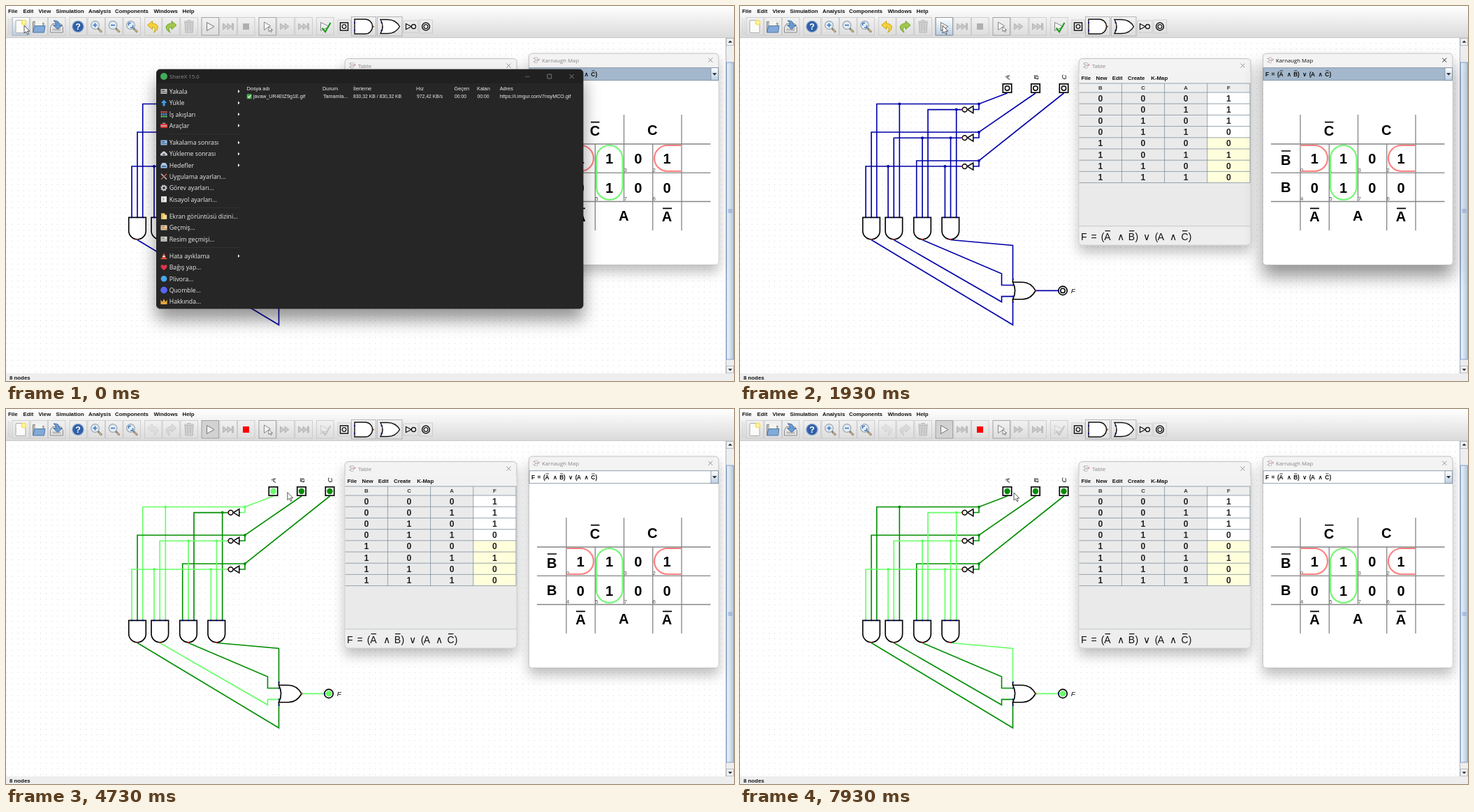
Recreate the animation shown at these times as an HTML page. Size 1042x538 px, loop 8000 ms.

```html
<!DOCTYPE html>
<html lang="en">
<head>
<meta charset="utf-8">
<title>Circuit simulation</title>
<style>
html, body { margin: 0; width: 100%; height: 100%; overflow: hidden; background: #fff; }
svg { display: block; width: 100vw; height: 100vh; }
text { font-family: "Liberation Sans", Arial, sans-serif; white-space: pre; }
.b { font-weight: bold; }
.m { text-anchor: middle; }
.i { font-style: italic; }
.u { font-family: "Open Sans", "Noto Sans", sans-serif; }
.off { filter: grayscale(1); opacity: .3; }
</style>
</head>
<body>
<svg id="stage" viewBox="0 0 1042 538" xmlns="http://www.w3.org/2000/svg"></svg>
<script>
const stage = document.getElementById('stage');
const text = (x, y, s, size, cls = '', fill = '#111') =>
  `<text x="${x}" y="${y}" font-size="${size}" class="${cls}" fill="${fill}">${s}</text>`;
const rect = (x, y, w, h, fill, more = '') =>
  `<rect x="${x}" y="${y}" width="${w}" height="${h}" fill="${fill}" ${more}/>`;
const path = (d, stroke, width = 1, fill = 'none', more = '') =>
  `<path d="${d}" ${stroke ? `stroke="${stroke}"` : ''} stroke-width="${width}" fill="${fill}" ${more}/>`;
const dot = (x, y, r, fill, more = '') => `<circle cx="${x}" cy="${y}" r="${r}" fill="${fill}" ${more}/>`;
const at = (x, y, inner, more = '') => `<g transform="translate(${x} ${y})" ${more}>${inner}</g>`;
const range = n => [...Array(n).keys()];

const gradient = (id, a, b, vertical = true) =>
  `<linearGradient id="${id}" x2="${vertical ? 0 : 1}" y2="${vertical ? 1 : 0}"><stop stop-color="${a}"/><stop offset="1" stop-color="${b}"/></linearGradient>`;
const shadow = (id, dy, blur, alpha) =>
  `<filter id="${id}" x="-20%" y="-20%" width="140%" height="150%"><feDropShadow dx="0" dy="${dy}" stdDeviation="${blur}" flood-opacity="${alpha}"/></filter>`;
const defs = `<defs>
${gradient('bar', '#fff', '#dadada')}${gradient('hot', '#fff', '#b8cfe5')}${gradient('thumb', '#f4f8fc', '#b0cae4', false)}
${shadow('near', 16, 12, .42)}${shadow('far', 10, 8.5, .25)}
<pattern id="grid" x=".36" y="4.3" width="8.12" height="8.12" patternUnits="userSpaceOnUse">${rect(0, 0, 1, 1, '#d2d2d2')}</pattern>
</defs>`;

// ---------- toolbar ----------
const buttons = [21, 47, 72.5, 103, 129, 154.5, 180, 210.5, 236, 262, 292, 318, 343.5, 374, 400, 426, 456.5];
const enabled = [0, 1, 2, 3, 4, 5, 6, 7, 8, 10, 13, 16];
const toggles = [10, 13];

const lens = inner => path('M2.5 2.5L8 8', '#777', 2.8) + path('M4 4L7.5 7.5', '#e8c46a', 1.1)
  + dot(-1.5, -2, 5.8, '#e3edf6', 'stroke="#9aa4ad" stroke-width="1.2"') + path(inner, '#3c74b8', 1.6);
const plus = 'M-4.5 -2H1.5M-1.5 -5V1';
const bend = 'M-8 -2L-1 -8V-4.5C9 -4 9 4 1 8.5C4 4 3 1 -1 .8V4Z';
const fast = (end = '') => path('M-7.5 -4.5L-1.5 0L-7.5 4.5ZM-1 -4.5L5 0L-1 4.5Z' + end, '#b4b4b4', 1, '#c8c8c8');
const pointer = path('M0 0V7L2 5.4L3.2 8L4.4 7.4L3.2 5H5.6Z', '#555', .7, '#fff');
const icons = [
  rect(-7, -9, 14, 18, '#fbfbf9', 'stroke="#aaa" rx="1"') + dot(4.5, -6, 4, '#f8e46c') + dot(4.5, -6, 2, '#fff8b0'),
  path('M-8.5 8V-7H-2L0 -5H7V8Z', '#888', 1, '#bdbdb4') + rect(-5, -8, 10, 7, '#f4f4f0') + path('M-6 -1H9L7.5 8.5H-8.5Z', '#4a76ab', 1, '#83aad6'),
  path('M-9 1L-6 -4H6L9 1V8.5H-9Z', '#888', 1, '#e4e4e4') + rect(-6, 3, 12, 3, '#bbb') + path('M-4.5 -8.5C3 -9 4 -5 4 -2H8L1.5 4L-5 -2H-1C-1 -5 -2 -7 -4.5 -8.5Z', '#2b5c9b', .8, '#6b9bd0'),
  dot(0, 0, 8.2, '#2f5fa6', 'stroke="#9db3d2" stroke-width="1.2"') + text(0, 4.4, '?', 12.5, 'b m', '#fff'),
  lens(plus), lens('M-4.5 -2H1.5'), lens('M-4.5 -1.5V-5H-1M1.5 -2V1.5H-2'),
  `<g id="undo">${path(bend, '#c4a000', .9, '#f3d13f')}</g>`,
  `<g id="redo"><g transform="scale(-1 1)">${path(bend, '#5f9a1e', .9, '#a3c84a')}</g></g>`,
  path('M-6 -6H6L5 8.5H-5ZM-7 -7.5H7M-2.5 -9H2.5M-2 -4V6M2 -4V6', '#b8b8b8', 1.1, '#d0d0d0'),
  path('M-4.5 -6L6 0L-4.5 6Z', '#777', 1, '#f0f0f0'),
  fast('M5.5 -4.5H7.5V4.5H5.5Z'),
  `<rect id="stop" x="-4.5" y="-4.5" width="9" height="9"/>`,
  path('M-4.5 -6.5L4.5 -1L-4.5 5Z', '#888', 1, '#f4f4f4') + at(2, 0, pointer),
  fast(), fast('M5.5 -4.5H7.5V4.5H5.5Z'),
  `<g id="check">${path('M-6 -6L6 0L-6 6Z', '#888', 1, '#f4f4f4') + path('M-4 2L.5 7.5L8 -5.5', '#22a022', 2.2)}</g>`
];
const frame = (x, w, y = 16.5, h = 25.5, color = '#c6c6c6') => rect(x, y, w, h, 'none', `stroke="${color}" stroke-width=".8"`);
const andIcon = path('M499 19H514A10.5 10.5 0 0 1 514 40H499Z', '#111', 1.4, '#fff')
  + dot(499, 24, 1, '#00a') + dot(499, 35, 1, '#00a') + dot(526, 29.5, 1, '#d00');
const orIcon = path('M536 19.5H546C556 19.5 561 25 563.5 29.5C561 34 556 39.5 546 39.5H536C540 33 540 26 536 19.5Z', '#111', 1.4, '#fff')
  + dot(537.5, 24, 1, '#00a') + dot(537.5, 35, 1, '#00a');
const menus = [['File', 3], ['Edit', 24.5], ['View', 46.5], ['Simulation', 71.5], ['Analysis', 118], ['Components', 156], ['Windows', 211.5], ['Help', 252.5]];
const toolbar = rect(0, 0, 1042, 45.5, 'url(#bar)') + path('M0 45.5H1042', '#c4c4c4', .8)
  + menus.map(([s, x]) => text(x, 10, s, 7.85, 'b')).join('')
  + path('M3.5 18V41M6 19V41', '#b5b5b5', 1, 'none', 'stroke-dasharray="1 1.6"')
  + `<rect id="hover" width="24.5" height="25.5" y="16.5" fill="url(#hot)" stroke="#8a9bb0" stroke-width=".8"/>`
  + `<rect id="pressed" x="280" width="24.5" height="25.5" y="16.5" fill="#d2d2d2"/>`
  + buttons.map((x, i) => frame(x - 12, 24.5, 16.5, 25.5, toggles.includes(i) ? '#929292' : '#c6c6c6') + at(x, 29.5, icons[i])).join('')
  + frame(475, 18.5, 20, 19) + frame(494.5, 35, 15.5, 27.5, '#a8a8a8') + frame(531.5, 35.5, 15.5, 27.5, '#a8a8a8') + frame(569, 21, 21, 17) + frame(592, 18.5, 20, 19)
  + rect(478.5, 24, 11, 11, '#fff', 'stroke="#111" stroke-width="1.5"') + dot(484, 29.5, 2.8, '#fff', 'stroke="#111" stroke-width="1.3"')
  + andIcon + orIcon
  + path('M572.5 25.5V33.5L580 29.5Z', '#111', 1.3, '#fff') + dot(583.5, 29.5, 3, '#fff', 'stroke="#111" stroke-width="1.3"')
  + dot(601, 29.5, 5.4, '#fff', 'stroke="#111" stroke-width="1.5"') + dot(601, 29.5, 2.9, '#fff', 'stroke="#111" stroke-width="1.3"');

const chrome = rect(1030.5, 46, 11.5, 481, '#eee') + path('M1030.5 46V527', '#9aa7b4', .8)
  + rect(1031, 46.4, 10.6, 10.3, '#f1f1f1', 'stroke="#9aa7b4" stroke-width=".7"') + path('M1033.5 52.5L1036.5 49.5L1039.5 52.5Z', '', 0, '#222')
  + rect(1031, 516.5, 10.6, 10.3, '#f1f1f1', 'stroke="#9aa7b4" stroke-width=".7"') + path('M1033.5 520.5L1036.5 523.5L1039.5 520.5Z', '', 0, '#222')
  + rect(1031.3, 81, 10, 426, 'url(#thumb)', 'stroke="#6382bf" stroke-width=".7"')
  + path('M1033.5 292H1039.5M1033.5 294H1039.5M1033.5 296H1039.5', '#6382bf', .7)
  + rect(0, 527, 1042, 11, '#eee') + text(5, 535.8, '8 nodes', 7.85, 'b');

// ---------- circuit ----------
const inputs = { A: [382.5, 140.5], B: [423, 181], C: [463.5, 222] };
const nets = {
  A: ['M382.5 125L342 140.5H195.7V303M228.3 140.5V303', [[228.3, 140.5]]],
  B: ['M423 125L342 181H188V303', []],
  C: ['M463.5 125L342 222H252.7V303', []],
  nA: ['M317.5 148.6H269V303M309.7 148.6V303', [[309.7, 148.6]]],
  nB: ['M317.5 189.2H220.2V303M261 189.2V303M301.5 189.2V303', [[261, 189.2], [301.5, 189.2]]],
  nC: ['M317.5 230H180V303M212 230V303M293.4 230V303', [[212, 230], [293.4, 230]]],
  g1: ['M188 335.5L390.5 457.5V425', []],
  g2: ['M220.3 335.5L374.5 424.5V416.6H391', []],
  g3: ['M261 335.5L374.5 384V400.5H391', []],
  g4: ['M301.5 335.5L390.5 343.5V392', []],
  F: ['M423 408.4H456', []]
};
for (const k of 'ABC') {
  const y = inputs[k][1];
  nets[k][0] += `M342 ${y}V${y + 8}H334.5`;
  nets[k][1].push([342, y]);
}
const wires = Object.entries(nets).map(([k, [d, joints]]) =>
  `<g id="net${k}">${path(d, '', 1.65)}${joints.map(([x, y]) => `<circle cx="${x}" cy="${y}" r="2" stroke="none"/>`).join('')}</g>`).join('');
const gates = [188, 220.3, 261, 301.3].map(x =>
  path(`M${x - 12.3} 303.3H${x + 12.3}V322.5A12.3 12.3 0 0 1 ${x - 12.3} 322.5Z`, '#000', 1.65, '#fff')
  + [-8.1, 0, 8.1].map(d => dot(x + d, 303.3, 1.1, '#00a')).join('') + dot(x, 335, 1.1, '#d00')).join('');
const inverters = Object.values(inputs).map(([, y]) => at(0, y + 8.1,
  path('M333.8 -5V5L325.5 0Z', '#000', 1.5, '#fff') + dot(321.6, 0, 3.4, '#fff', 'stroke="#000" stroke-width="1.5"')
  + dot(317.8, 0, 1, '#d00') + dot(334.2, 0, 1, '#00a'))).join('');
const pins = Object.entries(inputs).map(([k, [x]]) =>
  rect(x - 6.2, 111.8, 12.4, 12.4, '#fff', 'stroke="#000" stroke-width="1.65"')
  + `<circle id="pin${k}" cx="${x}" cy="118"/>`
  + `<text transform="translate(${x + 3.6} 105.6) rotate(-90)" font-size="9.8" class="i">${k}</text>`).join('');
const orGate = path('M390.5 396.2H404C414 396.2 420 403 423 408.4C420 414 414 420.7 404 420.7H390.5C394.5 413 394.5 404 390.5 396.2ZM390.5 392V396.2M390.5 420.7V425', '#000', 1.65, '#fff')
  + [392, 400.5, 416.6, 425].map(y => dot(390.8, y, 1.1, '#00a')).join('') + dot(423.3, 408.4, 1.1, '#d00');
const outPin = dot(462, 408.4, 6.2, '#fff', 'stroke="#000" stroke-width="1.65"') + '<circle id="pinF" cx="462" cy="408.4"/>'
  + dot(456, 408.4, 1.1, '#00a') + text(473.8, 412, 'F', 9.8, 'i');
const circuit = rect(0, 46, 1031, 481, '#fff') + rect(0, 46, 1031, 481, 'url(#grid)')
  + wires + gates + inverters + pins + orGate + outPin;

// ---------- tool windows ----------
const formula = (x, y, k, cls = '') => `<g transform="translate(${x} ${y}) scale(${k})">`
  + [['F', 4.3], ['=', 18.5], ['(', 31], ['A', 38], ['∧', 57], ['B', 72.5], [')', 79.8], ['∨', 94], ['(', 108], ['A', 114.5], ['∧', 132], ['C', 148.5], [')', 156]]
    .map(([s, dx]) => text(dx, 0, s, 14, 'm ' + cls)).join('')
  + path('M34.5 -13.6H42M69 -13.6H76.5M145 -13.6H152.5', '#111', 1.3) + '</g>';
const cross = (x, y, c) => path(`M${x - 3} ${y - 3}l6 6m0 -6l-6 6`, c, .9);
const appIcon = (x, y) => at(x, y, path('M0 1.5H4M0 6H4M6 4H9', '#999', .8) + rect(2.5, 0, 3.5, 3, '#fff', 'stroke="#999" stroke-width=".6"')
  + rect(2.5, 4.6, 3.5, 3, '#fff', 'stroke="#999" stroke-width=".6"') + dot(8.3, 2.5, 1, '#d88'));
const pane = (id, x, y, w, h) => `<rect ${id ? `id="${id}"` : ''} x="${x}" y="${y}" width="${w}" height="${h}" rx="5" fill="#f3f3f3" stroke="#b4b4b4" stroke-width=".8" filter="url(#far)"/>`;

const colX = [485.5, 546.7, 607.9, 669.1];
const rowY = r => 124 + 16.2 * r;
const tableRows = range(8).map(r => {
  const b = r >> 2, c = r >> 1 & 1, a = r & 1, f = a ? 1 - c : 1 - b;
  return rect(669, rowY(r), 61, 16.2, r < 4 ? '#fff' : '#ffffdc')
    + [b, c, a, f].map((v, i) => text(colX[i] + 30.3, rowY(r) + 12.5, v, 12.2, 'b m', '#222')).join('');
}).join('');
const table = pane('', 485, 75.5, 246, 267.5) + appIcon(491, 81.5) + text(504, 88.7, 'Table', 7.75, 'u', '#858585') + cross(719.5, 85.5, '#888')
  + rect(485.4, 96, 245.2, 14.5, '#f2f2f2')
  + [['File', 488.5], ['New', 509.5], ['Edit', 532.8], ['Create', 555], ['K-Map', 588.3]].map(([s, x]) => text(x, 105.5, s, 7.85, 'b')).join('')
  + rect(485.4, 110.5, 245.2, 205.5, '#eaeaea') + rect(485.4, 111, 244.6, 13, '#eee')
  + ['B', 'C', 'A', 'F'].map((s, i) => text(colX[i] + 30.3, 120.3, s, 7.85, 'b m', '#333')).join('')
  + tableRows
  + path(colX.slice(1).map(x => `M${x - .3} 111V253.6`).join('') + 'M730 111V253.6M485.5 111H730' + range(9).map(r => `M485.5 ${rowY(r)}H730`).join(''), '#7a8a99', .75)
  + path('M485.5 316H730.5', '#a5adb5', .8)
  + path('M485.4 316.4H730.6V338A4.6 4.6 0 0 1 726 342.6H490A4.6 4.6 0 0 1 485.4 338Z', '', 0, '#eee')
  + formula(488, 336.2, 1);

const kText = (x, y, s) => text(x, y, s, 20, 'b m', '#000');
const kCol = i => 822.4 + 41.2 * i;
const kmap = pane('kpane', 748.5, 68, 271.5, 303.5) + appIcon(754.5, 74)
  + '<text id="ktitle" x="767" y="81" font-size="7.75" class="u">Karnaugh Map</text><g id="kclose">' + cross(1008.3, 77.7, '') + '</g>'
  + path('M748.9 107H1019.6V366.5A4.6 4.6 0 0 1 1015 371.1H753.5A4.6 4.6 0 0 1 748.9 366.5Z', '', 0, '#fff')
  + '<rect id="combo" x="749" y="88.7" width="270.6" height="18" stroke="#7a8a99" stroke-width=".8"/>'
  + rect(1009, 88.7, 10.6, 18, 'url(#hot)', 'stroke="#7a8a99" stroke-width=".8"') + path('M1011 96.2H1017.4L1014.2 99.5Z', '', 0, '#222')
  + formula(752, 101, .595, 'b')
  + path('M802 156V322M843.3 198V322M884.5 156V280.5M925.7 198V322M967 156V322M760 198H1008.5M760 239.3H1008.5M760 280.5H1008.5', '#858585', 1.3)
  + [['C', 843, 186.3], ['C', 925.3, 185], ['B', 781.3, 227.8], ['B', 781.3, 267.2], ['A', 822.4, 309], ['A', 884.2, 308.3], ['A', 946, 309]].map(([s, x, y]) => kText(x, y, s)).join('')
  + path('M837 166.7H849.5M775 208H788M816 290.3H829M940 290.3H953', '#000', 1.7)
  + [[1, 1, 0, 1], [0, 1, 0, 0]].map((row, r) => row.map((v, i) => kText(kCol(i), 226.2 + 41.3 * r, v)).join('')).join('')
  + [[0, 1, 3, 2], [4, 5, 7, 6]].map((row, r) => row.map((v, i) => text(802 + 41.2 * i, 238.2 + 41.2 * r, v, 7.8, '', '#555')).join('')).join('')
  + path('M802.5 200H822.5A18.5 18.5 0 0 1 822.5 237H802.5M966.5 200H946.5A18.5 18.5 0 0 0 946.5 237H966.5', '#ff8080', 2.2)
  + rect(845, 200, 37.5, 78, 'none', 'rx="18.7" stroke="#72f772" stroke-width="2.2"');

// ---------- capture window ----------
const card = (a, b) => rect(-4.5, -3.5, 9, 7, a) + rect(-3.5, -2, 5, 1.6, b) + rect(-3.5, 1, 7, 1, b);
const solid = (d, fill) => path(d, '', 0, fill);
const entries = [
  ['Yakala', 122.5, 1, card('#b9bcc0', '#555')],
  ['Yükle', 139, 1, solid('M0 -4.5L4.3 0H1.6V4.5H-1.6V0H-4.3Z', '#3f9bea')],
  ['İş akışları', 155.3, 1, range(9).map(i => rect(i % 3 * 3.2 - 4.4, (i / 3 | 0) * 3.2 - 4.4, 2.4, 2.4, ['#e04b4b', '#4b8fe0', '#5fc05f'][(i / 3 | 0)])).join('')],
  ['Araçlar', 171.5, 1, rect(-4.7, -2.5, 9.4, 6, '#d93434') + rect(-2, -4, 4, 1.5, '#999') + rect(-4.7, 0, 9.4, 1, '#eee')],
  ['Yakalama sonrası', 196, 1, card('#9cc3ea', '#2c5f97')],
  ['Yükleme sonrası', 212.2, 1, solid('M-4.5 2.5A2.5 2.5 0 0 1 -3 -1.5A3.2 3.2 0 0 1 3 -1.5A2.5 2.5 0 0 1 4.5 2.5Z', '#c9ced4') + path('M0 4.5V0M-1.8 1.5L0 -.5L1.8 1.5', '#444', 1)],
  ['Hedefler', 228.5, 1, solid('M-4.5 4V0L-2.5 -3.5H2.5L4.5 0V4Z', '#a9c6e6') + rect(-3, .5, 6, 2, '#3d6ea5')],
  ['Uygulama ayarları...', 244.8, 0, path('M-4 -4L4 4', '#c9c9c9', 1.5) + path('M4 -4L-4 4', '#d35b4b', 1.5)],
  ['Görev ayarları...', 261, 0, dot(0, 0, 2.7, 'none', 'stroke="#c4c8cc" stroke-width="2"') + dot(0, 0, 4, 'none', 'stroke="#c4c8cc" stroke-width="1.3" stroke-dasharray="1.6 1.54"')],
  ['Kısayol ayarları...', 277.3, 0, rect(-4, -4.2, 8, 8.4, '#e6e8ea') + path('M-2 -2L0 0L-2 2', '#666', 1)],
  ['Ekran görüntüsü dizini...', 301.6, 0, rect(-4, -4.3, 5.5, 8.6, '#e8bf55') + rect(-1, -2, 5.2, 6.3, '#f4dd96')],
  ['Geçmiş...', 318, 0, card('#ead8b4', '#c4743a')],
  ['Resim geçmişi...', 334.3, 0, card('#dcdcd4', '#7d7d74')],
  ['Hata ayıklama', 358.7, 1, solid('M0 -4.7L3 3H4.5V4.5H-4.5V3H-3Z', '#e2533d') + path('M-2 .5H2', '#fff', 1.4)],
  ['Bağış yap...', 375, 0, solid('M0 4.3C-8 -1.5 -3.5 -6.5 0 -2.3C3.5 -6.5 8 -1.5 0 4.3Z', '#e0344a')],
  ['Plivora...', 391.3, 0, dot(0, 0, 4.3, '#4aa7e8')],
  ['Quomble...', 407.6, 0, dot(0, 0, 4.8, '#5865f2')],
  ['Hakkında...', 424, 0, solid('M-4.5 4L-4.7 -2.5L-2 .5L0 -4L2 .5L4.7 -2.5L4.5 4Z', '#e9a63a')]
];
const cells = [
  [344.5, 'Dosya adı', 354, 'javaw_UR4EtZ9g1E.gif', 7.2], [453, 'Durum', 454, 'Tamamla...', 7.2],
  [497, 'İlerleme', 497, '830,32 KB / 830,32 KB', 6.8], [587, 'Hız', 588, '972,42 KB/s', 6.8],
  [641.5, 'Geçen', 642, '00:00', 6.8], [674, 'Kalan', 674.5, '00:00', 6.8],
  [706.7, 'Adres', 706.7, 'https://i.imgur.com/7nsyMCO.gif', 7.2]
];
const capture = rect(215.5, 91, 610.5, 343, '#282828', 'rx="5" stroke="#161616" stroke-width=".8" filter="url(#near)"')
  + solid('M215.9 111V96A4.6 4.6 0 0 1 220.5 91.4H821A4.6 4.6 0 0 1 825.6 96V111Z', '#202020')
  + dot(226, 101, 5, '#3fae5a') + text(234, 104, 'ShareX 15.0', 7.8, 'u', '#8d8d8d')
  + path('M743 101.3H749.5', '#6a6a6a', .9) + rect(774.8, 98, 6, 6, 'none', 'rx="1" stroke="#8a8a8a" stroke-width=".9"') + cross(809.7, 101, '#8a8a8a')
  + path('M234 183.7H336M234 289.5H336M234 346.5H336', '#343434', .8)
  + entries.map(([s, y, sub, icon]) => at(226, y, icon) + text(233.7, y + 3.2, s, 8.75, 'u', '#ececec')
    + (sub ? solid(`M332 ${y - 2.4}L334.6 ${y}L332 ${y + 2.4}Z`, '#eee') : '')).join('')
  + cells.map(([x, h, vx, v, size]) => text(x, 120.6, h, 7.35, '', '#eee') + text(vx, 132.3, v, size, '', '#eee')).join('')
  + rect(344.7, 126.3, 7, 7, '#3fae49', 'rx="1"') + path('M346.2 129.8L347.8 131.4L350.4 128', '#fff', 1.1);

const tipLines = ['Can be used to interactively manipulate an input signal in a circuit', 'with the mouse. This element is also used to connect a circuit to an',
  'embedding circuit. In this case the connection is bidirectional. Is', 'also used to assign an pin number, if code for a CPLD or FPGA is', 'generated. Exportable to VHDL/Verilog.'];
const tip = rect(381.5, 128.3, 260.5, 55.2, '#b8cfe5', 'stroke="#6382bf" stroke-width=".8"')
  + tipLines.map((s, i) => text(383.5, 137.2 + 10.9 * i, s, 7.85, 'b')).join('');

stage.innerHTML = defs + circuit + toolbar + chrome + table + kmap
  + `<g id="capture">${capture}</g><g id="tip">${tip}</g>`
  + `<g id="arrow">${path('M0 0V11L2.6 8.8L4.5 12.7L6.2 11.9L4.4 8.1H7.8Z', '#222', .75, '#fff')}</g>`
  + `<g id="resize">${path('M-7 0L-3.2 -3.2V-1H3.2V-3.2L7 0L3.2 3.2V1H-3.2V3.2Z', '#222', .75, '#fff')}</g>`;

// ---------- motion ----------
const $ = Object.fromEntries([...stage.querySelectorAll('[id]')].map(e => [e.id, e]));
const set = (e, attrs) => { for (const k in attrs) e.setAttribute(k, attrs[k]); };
const show = (e, on) => { e.style.display = on ? '' : 'none'; };
const within = (t, a, b) => t >= a && t < b;

const track = [
  [0, 26, 28], [40, 26, 28], [790, 745, 102], [870, 745, 107], [1020, 745, 107], [1130, 709, 100],
  [1350, 709, 100], [1930, 290, 28], [2270, 290, 28], [2600, 548, 148], [3070, 393, 121], [3270, 381.5, 119],
  [4430, 381.5, 119], [5000, 421, 120], [5260, 421, 120], [5600, 457, 150], [5700, 457, 150], [6000, 456, 123], [6130, 464, 119],
  [6180, 464, 119], [6480, 422, 120], [6560, 422, 120], [6870, 458, 125], [7130, 463, 118], [7380, 463, 118],
  [7730, 383, 119], [7810, 383, 119], [7930, 392, 120], [8000, 392, 120]
];
function cursorAt(t) {
  const i = track.findIndex(k => k[0] > t);
  const [t0, x0, y0] = track[i - 1], [t1, x1, y1] = track[i];
  const u = (t - t0) / (t1 - t0), e = u * u * (3 - 2 * u);
  return [x0 + (x1 - x0) * e, y0 + (y1 - y0) * e];
}

const HIGH = '#66ff66', LOW = '#008e00', IDLE = '#0000a8';
function render(t) {
  const running = t >= 2270;
  const A = within(t, 4400, 7800), B = within(t, 5200, 6530), C = within(t, 6130, 7330);
  const level = {
    A, B, C, nA: !A, nB: !B, nC: !C,
    g1: A && B && !C, g2: A && !B && !C, g3: !A && !B && C, g4: !A && !B && !C, F: A ? !C : !B
  };
  for (const k in level) {
    const color = running ? (level[k] ? HIGH : LOW) : IDLE;
    set($['net' + k], { stroke: color, fill: color });
  }
  for (const k of 'ABCF') set($['pin' + k], running
    ? { r: 4.2, fill: level[k] ? HIGH : LOW, stroke: 'none' }
    : { r: 3.2, fill: '#fff', stroke: '#000', 'stroke-width': 1.5 });

  for (const k of ['undo', 'redo', 'check']) $[k].classList.toggle('off', running);
  set($.stop, { fill: running ? '#ff0000' : '#b0b0b0' });
  show($.pressed, running);

  const active = within(t, 870, 2270);
  set($.kpane, { filter: active ? 'url(#near)' : 'url(#far)' });
  set($.ktitle, { fill: active ? '#111' : '#858585' });
  set($.kclose, { stroke: active ? '#111' : '#888' });
  set($.combo, { fill: running ? '#fff' : '#a3b8cc' });

  const shrink = t < 870 ? 0 : t < 930 ? 1 : 4;
  show($.capture, t < 1000);
  set($.capture, {
    transform: `translate(${215.5 + 11 * shrink} ${91 + 11 * shrink}) scale(${1 - .0245 * shrink}) translate(-215.5 -91)`,
    opacity: shrink > 1 ? .5 : 1
  });
  show($.tip, within(t, 4070, 4400));

  const [x, y] = cursorAt(t), sizing = within(t, 865, 1055);
  for (const e of [$.arrow, $.resize]) set(e, { transform: `translate(${x} ${y})` });
  show($.arrow, !sizing);
  show($.resize, sizing);
  const over = running || y < 17 || y > 41 ? undefined : enabled.find(i => Math.abs(x - buttons[i]) < 12);
  show($.hover, over !== undefined);
  if (over !== undefined) set($.hover, { x: buttons[over] - 12 });
}

const start = performance.now();
function tick() {
  render((performance.now() - start) % 8000);
  requestAnimationFrame(tick);
}
tick();
</script>
</body>
</html>
```
